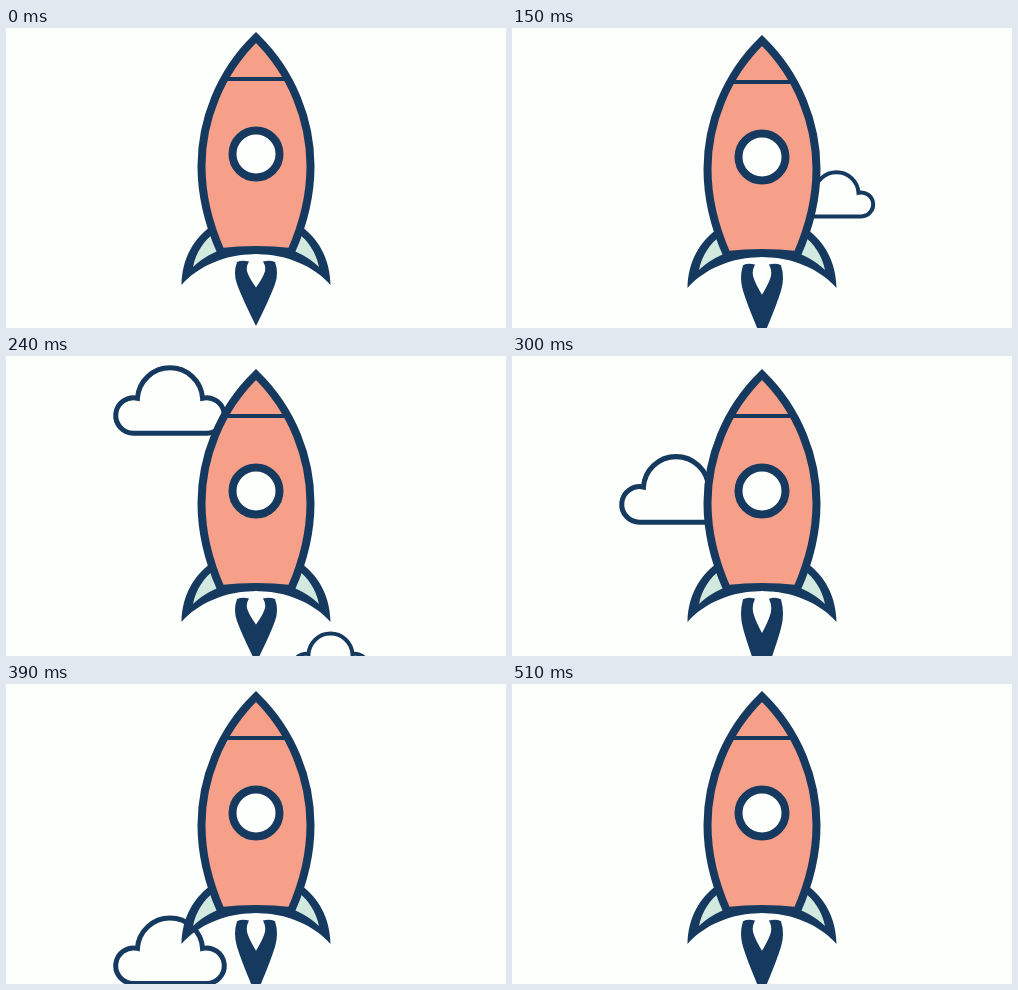
Write an HTML page that moves like this. It is 500 by 300 pixels and loops after 540 ms.

```html
<!DOCTYPE html>
<html lang="en">
<head>
<meta charset="utf-8">
<title>Rocket</title>
<style>
  html, body { margin: 0; width: 100%; height: 100%; overflow: hidden; background: #fdfffc; }
  svg { display: block; width: 500px; height: 300px; }
  .line { stroke: #163a5f; stroke-width: 8; }
  .navy { fill: #163a5f; }
  .pink { fill: #f69f89; }
  .mint { fill: #d2e9e0; }
  .white { fill: #fdfffc; }
</style>
</head>
<body>
<svg viewBox="0 0 500 300">
  <defs>
    <path id="cloud" class="white" stroke="#163a5f"
      d="M-24.6 46.2A12 12 0 1 1-22 22.5A22.05 22.05 0 0 1 22 22.5A12 12 0 1 1 24.6 46.2Z"/>
    <path id="fin" class="mint" d="M208 205C198 213 190 224 187 239C194 232 204 225.5 216 221.5Z"/>
  </defs>

  <g id="rightCloud"><use href="#cloud" stroke-width="4"/></g>
  <g id="leftCloud"><use href="#cloud" transform="scale(1.48)" stroke-width="3.4"/></g>

  <path id="flame" class="navy"
    d="M-19 1Q-14-1-7 .5Q-11 7-8 13Q-6 18 0 26.5Q6 18 8 13Q11 7 7 .5Q14-1 19 1Q23 12 19 23Q14 37 0 65Q-14 37-19 23Q-23 12-19 1Z"/>

  <g id="rocket">
    <path class="navy" d="M204 199C188 211 176 230 175.5 257C192 238 220 226 250 226C280 226 308 238 324.5 257C324 230 312 211 296 199Z"/>
    <use href="#fin"/>
    <use href="#fin" transform="matrix(-1 0 0 1 500 0)"/>
    <path class="pink line" d="M250 9.5C213.5 45 195.5 93 195.5 138C195.5 170 203 197 215 224Q250 220 285 224C297 197 304.5 170 304.5 138C304.5 93 286.5 45 250 9.5Z"/>
    <path class="line" style="stroke-width:4" d="M219 51H281"/>
    <circle class="white line" cx="250" cy="126" r="23.5"/>
  </g>
</svg>
<script>
  const STEP = 30, STEPS = 18, CLOUD_SPEED = 400 / 9;
  const place = (id, transform) =>
    document.getElementById(id).setAttribute("transform", transform);

  // Cosine swing from 0 to 1 and back over the given number of steps
  const swing = (step, period) => (1 - Math.cos(2 * Math.PI * step / period)) / 2;

  function draw() {
    const step = Math.floor(performance.now() / STEP) % STEPS;
    const bob = 12 * swing(step, 6);
    const stretch = 1 + 0.32 * swing(step, 4);
    place("rocket", `translate(0 ${bob})`);
    place("flame", `translate(250 ${233 + bob}) scale(1 ${stretch})`);
    place("rightCloud", `translate(324.5 ${-80 + CLOUD_SPEED * step})`);
    place("leftCloud", `translate(164 ${-80 + CLOUD_SPEED * (step - 6)})`);
    requestAnimationFrame(draw);
  }
  draw();
</script>
</body>
</html>
```
